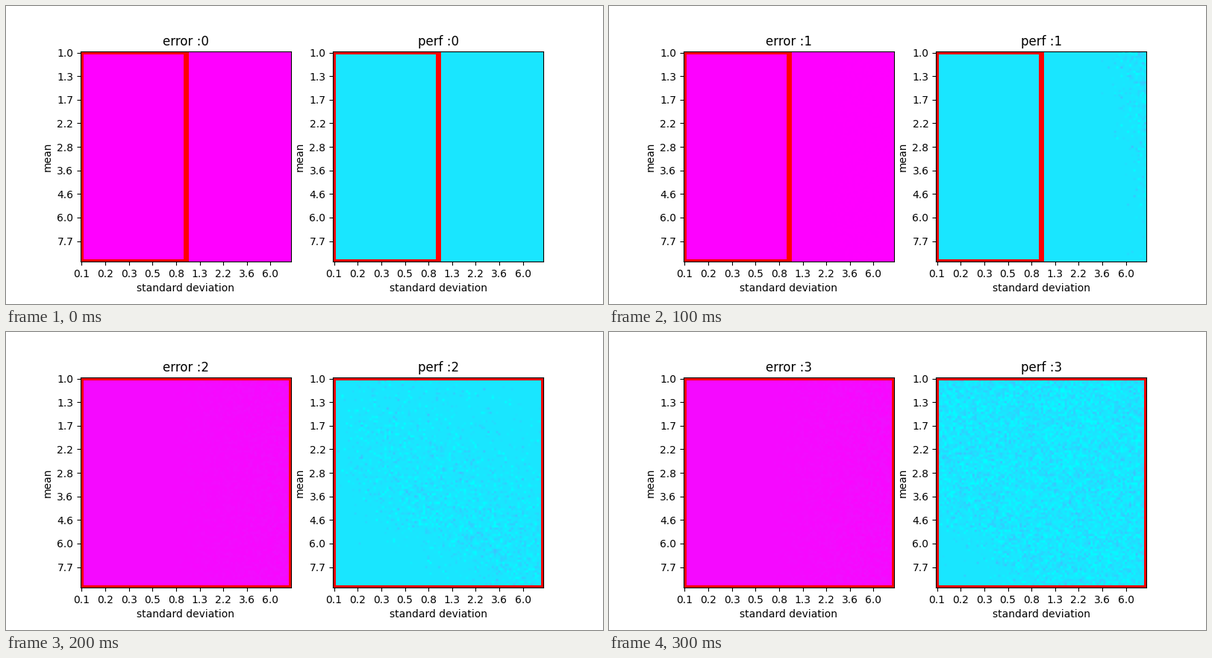
A matplotlib script for the animation above (400 ms loop, 800 px wide and 400 px high).

```python
import numpy as np
import matplotlib.pyplot as plt
from matplotlib.animation import FuncAnimation
from matplotlib.patches import Rectangle

N = 98          # cells per side
STEPS = 4
BASE = 0.1      # chance-level performance

v, u = np.mgrid[0:N, 0:N] / (N - 1)


def sigmoid(x):
    return 1 / (1 + np.exp(-x))


def noise_density(step):
    """Share of cells that have left the chance level."""
    if step == 1:
        return 0.75 * sigmoid((u - 0.89 - 0.17 * v) / 0.032)
    if step == 2:
        off = v - 0.32 - 0.64 * u
        spread = np.where(off > 0, 0.18, 0.45)
        band = np.exp(-(off / spread) ** 2)
        return 0.7 * band * sigmoid((u - 0.15) / 0.06)
    if step == 3:
        return 0.9 * sigmoid((0.6 + 0.83 * u - v) / 0.055)
    return np.zeros_like(u)


def perf_map(step):
    rng = np.random.default_rng(10 + step)
    active = rng.random((N, N)) < noise_density(step)
    jitter = rng.normal(0, 0.058, (N, N))
    return np.clip(BASE + active * jitter, 0, 0.26)


def error_map(step):
    """Level that drops once, with noise growing along the deviation axis."""
    rng = np.random.default_rng(50 + step)
    level = (1.0, 0.99, 0.96, 0.96)[step]
    rise = (0, 0.008, 0, 0)[step]
    spread = (0, 0.002, 0.012, 0.016)[step]
    ramp = np.clip((u - 0.35) / 0.65, 0, 1)
    return level + rise * u + spread * ramp * rng.normal(-0.3, 1, (N, N))


maps = [(error_map(i), perf_map(i)) for i in range(STEPS)]

fig, axes = plt.subplots(1, 2, figsize=(8, 4), dpi=100)
ticks = np.arange(0, N, 11)
means = [f"{10 ** (k / 9):.1f}" for k in range(9)]
devs = [f"{0.1 * 10 ** (2 * k / 9):.1f}" for k in range(9)]

images, boxes = [], []
for ax, data in zip(axes, maps[0]):
    images.append(ax.imshow(data, cmap="cool", vmin=0, vmax=1))
    box = Rectangle((-0.5, -0.5), N / 2, N, fill=False,
                    edgecolor="red", linewidth=5)
    boxes.append(ax.add_patch(box))
    ax.set_xticks(ticks, devs)
    ax.set_yticks(ticks, means)
    ax.set_xlabel("standard deviation")
    ax.set_ylabel("mean")


def draw(step):
    width = N / 2 if step < 2 else N
    for ax, name, image, box, data in zip(axes, ("error", "perf"),
                                          images, boxes, maps[step]):
        image.set_data(data)
        box.set_width(width)
        ax.set_title(f"{name} :{step}")
    return images + boxes


anim = FuncAnimation(fig, draw, frames=STEPS, init_func=lambda: draw(0),
                     interval=100, repeat=True, repeat_delay=0, blit=False)
plt.show()
```
